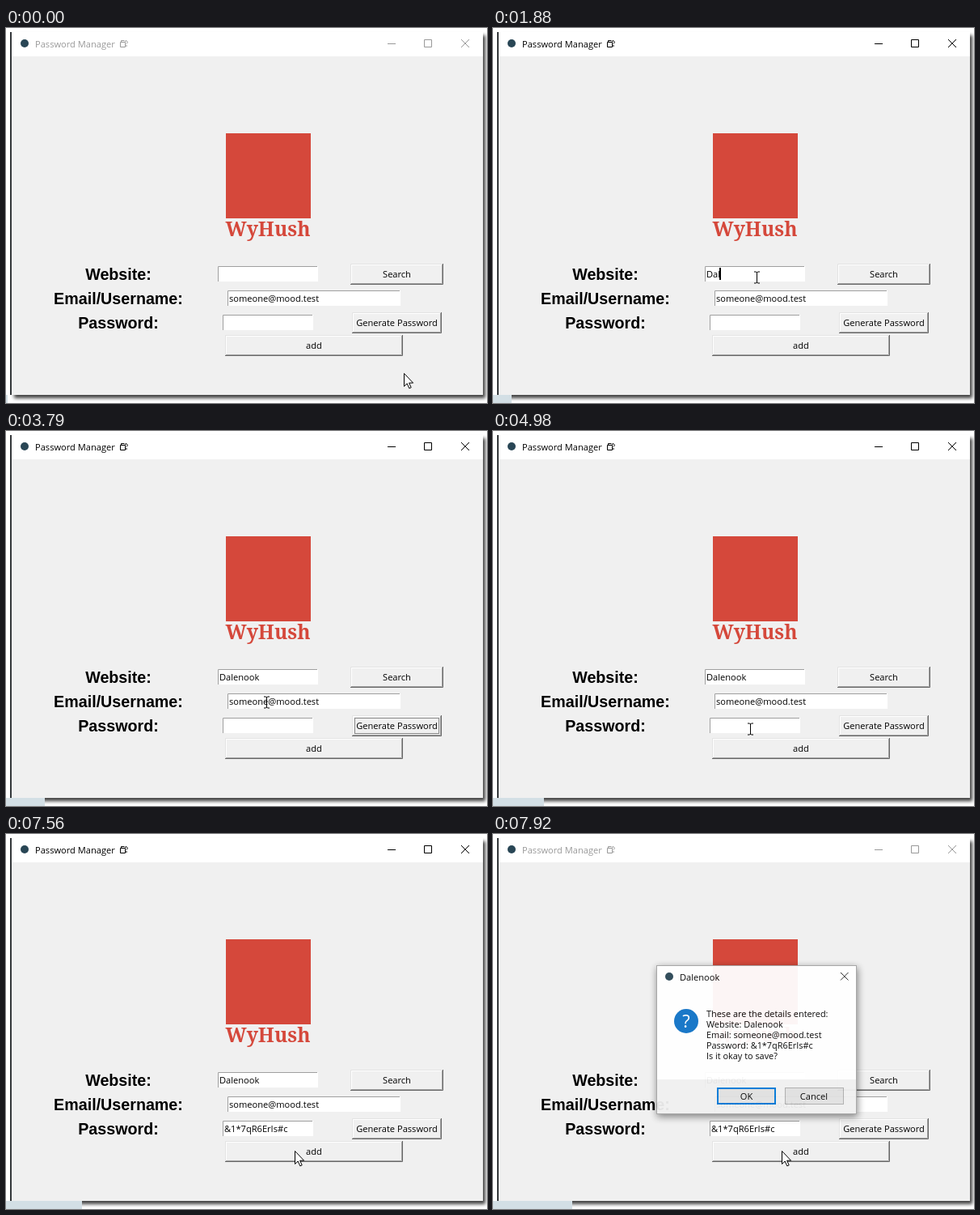
Animation of 595x463 px, one loop 8000 ms. Source, as an HTML page:

```html
<!DOCTYPE html>
<html lang="en">
<head>
<meta charset="utf-8">
<title>Password Manager</title>
<style>
  html, body { margin: 0; width: 100%; height: 100%; overflow: hidden; background: #fff; }
  svg { display: block; width: 100%; height: 100%; font: 11.1px "Open Sans", "Noto Sans", sans-serif; }
  text { white-space: pre; }
  .label { font: bold 19.7px "Liberation Sans", Arial, sans-serif; text-anchor: middle; }
  .wordmark { font: 900 24.5px "Noto Serif", serif; fill: #d5483b; text-anchor: middle; }
  .mid { text-anchor: middle; }
  .line { fill: none; stroke: currentColor; }
  .dots { fill: none; stroke: #222; stroke-dasharray: 1 1; }
  .frame { filter: drop-shadow(3px 4px 2px rgba(0, 0, 0, .75)); }
  .dialog { filter: drop-shadow(1px 3px 5px rgba(0, 0, 0, .5)); }
</style>
</head>
<body>
<svg viewBox="0 0 595 463" xmlns="http://www.w3.org/2000/svg">
  <rect class="frame" x="7" y="5" width="583" height="448" fill="#f0f0f0"/>
  <rect x="5" y="5" width="2" height="448" fill="#34383b"/>
  <rect x="7" y="5" width="583" height="30" fill="#fff"/>
  <circle cx="23" cy="19" r="5" fill="#294655"/>
  <g id="titlebar">
    <text x="36" y="24" fill="currentColor">Password Manager</text>
    <path class="line" d="M141.5 17.5h6v6h-6zM142.500 17v-1.500h4M147 16.500l2-1 1.500 2-1.500 2M148 22h2"/>
    <path class="line" d="M472 19.500h10M517.500 14.500h9v9h-9zM563 14l10 10M573 14l-10 10"/>
  </g>

  <rect x="272" y="130" width="105" height="105" fill="#d5483b"/>
  <text class="wordmark" x="324" y="257">WyHush</text>

  <text class="label" x="139" y="311">Website:</text>
  <text class="label" x="139" y="341">Email/Username:</text>
  <text class="label" x="139" y="371">Password:</text>

  <g id="widgets"></g>
  <rect id="caret" width="2" height="15"/>
  <rect id="bar" y="453" height="10" fill="#d3dfe5"/>

  <g id="dialog" opacity=".95">
    <rect class="dialog" x="202" y="162" width="248" height="184" fill="#fff"/>
    <rect x="202.500" y="162.500" width="247" height="183" fill="none" stroke="#a4a4a4"/>
    <rect x="203" y="303" width="246" height="42" fill="#f0f0f0"/>
    <circle cx="218" cy="176" r="5" fill="#294655"/>
    <text id="heading" x="231" y="181"></text>
    <path d="M430 171l9.500 9.500M439.500 171l-9.500 9.500" stroke="#222"/>
    <circle cx="239" cy="231" r="15" fill="#0f72c6"/>
    <text class="mid" x="239" y="239" fill="#fff" style="font-size:22px">?</text>
    <g id="details" style="font-size:10.900px"></g>
    <rect x="278" y="314" width="71" height="19" fill="#e1e1e1" stroke="#0078d7" stroke-width="2"/>
    <rect x="361.500" y="313.500" width="72" height="20" fill="#e1e1e1" stroke="#adadad"/>
    <text class="mid" x="313.500" y="328">OK</text>
    <text class="mid" x="397" y="328">Cancel</text>
  </g>

  <circle id="halo" r="12" fill="#faf04a" opacity=".8"/>
  <path id="arrow" d="M.5.5V16.500l3.700-3.500 2.600 5.900 2.400-1-2.600-5.700h5z" fill="#fff" stroke="#000"/>
  <path id="beam" class="line" d="M-3.500-7h2.500l1 1 1-1h2.500M0-6.500v13M-3.500 7h2.500l1-1 1 1h2.500"/>
</svg>
<script>
const LOOP = 8000, STEP = 172;
const SITE = 'Dalenook', EMAIL = 'someone@mood.test', SECRET = '&1*7qR6ErIs#c';
const TYPED = [1, 2, 3, 4, 6, 7, 8];
const $ = id => document.getElementById(id);
const show = (el, on) => el.setAttribute('display', on ? 'inline' : 'none');
const place = (el, x, y) => el.setAttribute('transform', `translate(${x} ${y})`);

function add(parent, tag, attrs, text = '') {
  const el = document.createElementNS('http://www.w3.org/2000/svg', tag);
  for (const name in attrs) el.setAttribute(name, attrs[name]);
  el.textContent = text;
  return parent.appendChild(el);
}

function makeEntry(x, y, width) {
  const g = $('widgets');
  add(g, 'rect', { x, y, width, height: 19, fill: '#fff' });
  add(g, 'path', { d: `M${x + .5} ${y + 19}v-18.5h${width - 1.5}`, fill: 'none', stroke: '#a0a0a0' });
  const mark = add(g, 'rect', { x: x + 2, y: y + 2, height: 15, fill: '#0078d7' });
  const text = add(g, 'text', { x: x + 2, y: y + 14 });
  return {
    x, y,
    set(value, selected) {
      text.textContent = value;
      this.end = value ? text.getComputedTextLength() : 0;
      text.setAttribute('fill', selected ? '#fff' : '#000');
      mark.setAttribute('width', selected ? this.end : 0);
    }
  };
}

function makeButton(x, y, w, label) {
  const h = 26, g = $('widgets');
  const corner = (inset, low) => low
    ? `M${x + inset} ${y + h - inset - .5}H${x + w - inset - .5}V${y + inset}`
    : `M${x + inset + .5} ${y + h - inset}V${y + inset + .5}H${x + w - inset}`;
  const edge = (inset, low) => add(g, 'path', { d: corner(inset, low), fill: 'none' });
  const edges = [edge(0, false), edge(1, false), edge(1, true), edge(0, true)];
  const text = add(g, 'text', { x: x + w / 2, y: y + 17, class: 'mid' }, label);
  const ring = add(g, 'rect', { x: x + 3.5, y: y + 3.5, width: w - 7, height: h - 7, class: 'dots' });
  return (pressed, focused) => {
    const colors = ['#e3e3e3', '#fff', '#a0a0a0', '#696969'];
    if (pressed) colors.reverse();
    edges.forEach((e, i) => e.setAttribute('stroke', colors[i]));
    place(text, +pressed, +pressed);
    show(ring, focused);
  };
}

const entries = {
  site: makeEntry(262, 294, 124),
  email: makeEntry(274, 324, 214),
  secret: makeEntry(268, 354, 112)
};
const searchButton = makeButton(426, 291, 115, 'Search');
const generateButton = makeButton(428, 351, 111, 'Generate Password');
const addButton = makeButton(271, 379, 220, 'add');

$('heading').textContent = SITE;
['These are the details entered:', `Website: ${SITE}`, `Email: ${EMAIL}`,
  `Password: ${SECRET}`, 'Is it okay to save?']
  .forEach((s, i) => add($('details'), 'text', { x: 264, y: 226 + 13 * i }, s));

// Pointer stops: step, x, y
const PATH = [
  [0, 492, 426], [1, 470, 408], [2, 382, 345], [3, 326, 308], [14, 326, 308], [16, 325, 308],
  [21, 325, 308], [23, 318, 362], [24, 318, 368], [33, 318, 368], [34, 324, 367],
  [37, 429, 357], [40, 429, 357], [41, 422, 363], [43, 360, 390], [44, 357, 391], [47, 357, 391]
];
// Focus changes: step, widget, time at which its caret starts blinking
const FOCUS = [
  [0, ''], [3, 'site', 506], [16, 'search'], [18, 'email', 3086],
  [20, 'secret', 3430], [22, 'generate'], [24, 'secret', 4110], [46, '']
];
const CLICKS = [3, 24, 38, 45];

function pointerAt(k) {
  const i = PATH.findIndex(p => p[0] > k);
  const [k0, x0, y0] = PATH[i - 1], [k1, x1, y1] = PATH[i];
  const u = (k - k0) / (k1 - k0);
  return [Math.round(x0 + (x1 - x0) * u), Math.round(y0 + (y1 - y0) * u)];
}

function draw(k) {
  const time = Math.max(0, k * STEP - 10);
  const [, focus, since] = FOCUS.findLast(f => f[0] <= k);
  const typing = k >= 8 && k < 15;
  const active = k >= 3 && k < 46;

  $('titlebar').setAttribute('color', active ? '#000' : '#999');
  $('bar').setAttribute('width', Math.round(2 + time * .0122));

  entries.site.set(k < 8 ? '' : SITE.slice(0, TYPED[Math.min(k - 8, 6)]));
  entries.email.set(EMAIL, focus === 'email');
  entries.secret.set(k < 39 ? '' : SECRET);
  searchButton(false, focus === 'search');
  generateButton(k === 38, focus === 'generate');
  addButton(k === 45, false);

  const field = entries[focus];
  show($('caret'), field && (typing || (time - since) % 900 < 600));
  if (field) place($('caret'), field.x + 1 + Math.round(field.end), field.y + 2);

  const [x, y] = pointerAt(k);
  const overEntry = k >= 3 && k < 36;
  show($('arrow'), !overEntry);
  show($('beam'), overEntry);
  show($('halo'), CLICKS.includes(k));
  for (const id of ['arrow', 'halo']) place($(id), x, y);
  place($('beam'), x + .5, y);
  show($('dialog'), k >= 46);
}

let shown = -1;
const start = performance.now();
function tick() {
  const t = (performance.now() - start) % LOOP;
  const k = Math.min(46, Math.floor((t + 10) / STEP));
  if (k !== shown) draw(shown = k);
  requestAnimationFrame(tick);
}
tick();
</script>
</body>
</html>
```
